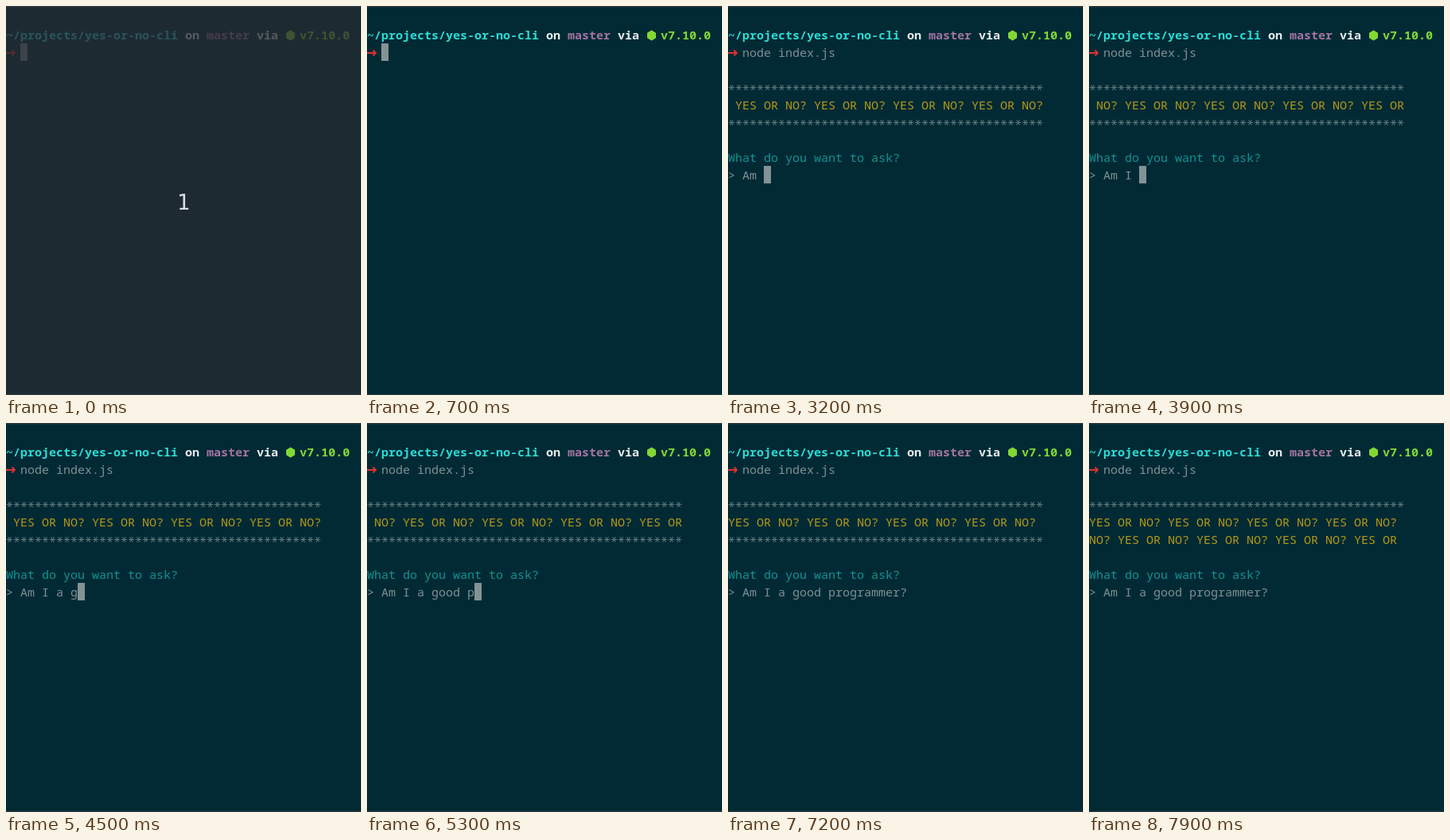
These frames come from a looping animation (446 by 489 pixels, 8 s). An HTML page:

```html
<!DOCTYPE html>
<html lang="en">
<head>
<meta charset="utf-8">
<title>Yes or no terminal</title>
<style>
  html, body { margin: 0; width: 100%; height: 100%; overflow: hidden; background: #022a35; }
  svg { display: block; width: 446px; height: 489px; }
  text { font: 15px "Noto Sans Mono", "DejaVu Sans Mono", monospace; white-space: pre; }
  .bold { font-weight: 700; }
  #count { font: 27px "DejaVu Sans Mono", "Noto Sans Mono", monospace; }
</style>
</head>
<body>
<svg id="stage" viewBox="0 0 446 489">
  <rect width="446" height="489" fill="#022a35"/>
  <g id="screen"></g>
  <g id="intro">
    <rect width="446" height="489" fill="#282b31" opacity=".76"/>
    <text id="count" x="223" y="256" text-anchor="middle" fill="#d8dcdd">1</text>
  </g>
  <path d="M0 .75H446M0 488.5H446" stroke="#2b383e" stroke-width="1.5"/>
</svg>
<script>
const LOOP = 8000, CELL = 9, ROW = 22, COLS = 44;
const GREY = "#7f9093", TEAL = "#149291", GOLD = "#b39a17";
const COMMAND = "node index.js", QUESTION = "Am I a good programmer?";
const YES_FIRST = Array(4).fill("YES OR NO?").join(" ");
const NO_FIRST = Array(4).fill("NO? YES OR").join(" ");
const RUN = 1800, BANNER = 2600, TOGGLE = 720, ENTER = 7150;

const screen = document.getElementById("screen");
const intro = document.getElementById("intro");

function add(tag, attrs) {
  const el = document.createElementNS("http://www.w3.org/2000/svg", tag);
  for (const key in attrs) el.setAttribute(key, attrs[key]);
  screen.appendChild(el);
  return el;
}

function label(col, row, fill, content = "", cls = "") {
  const el = add("text", { x: col * CELL, y: 42 + row * ROW, fill, class: cls });
  el.textContent = content;
  return el;
}

function starRow(row) {
  const y = 36.5 + row * ROW;
  let d = "";
  for (let i = 0; i < COLS; i++) {
    const x = (i + 0.5) * CELL;
    for (const angle of [0, Math.PI / 3, -Math.PI / 3]) {
      const dx = 3.8 * Math.cos(angle), dy = 3.8 * Math.sin(angle);
      d += `M${(x - dx).toFixed(1)} ${(y - dy).toFixed(1)}L${(x + dx).toFixed(1)} ${(y + dy).toFixed(1)}`;
    }
  }
  return add("path", { d, stroke: "#587377", "stroke-width": 1.1 });
}

const show = (el, on) => el.setAttribute("visibility", on ? "visible" : "hidden");

label(0, 0, "#2adcd5", "~/projects/yes-or-no-cli", "bold");
label(25, 0, "#e6eeee", "on", "bold");
label(28, 0, "#a3749f", "master", "bold");
label(35, 0, "#e6eeee", "via", "bold");
add("path", { d: "M357.5 30.5l5.5 3.2v6.6l-5.5 3.2l-5.5-3.2v-6.6z", fill: "#82d833" });
label(41, 0, "#82d833", "v7.10.0", "bold");
add("path", { d: "M0 59H10.5M7.5 55.5L11 59L7.5 62.5", fill: "none", stroke: "#e03131", "stroke-width": 1.8 });

const command = label(2, 1, GREY);
const topStars = starRow(3);
const banner = label(1, 4, GOLD);
const bottomStars = starRow(5);
const lowerBanner = label(0, 5, GOLD, NO_FIRST);
const ask = label(0, 7, TEAL, "What do you want to ask?");
const prompt = label(0, 8, GREY, ">");
const answer = label(2, 8, GREY);
const cursor = add("rect", { width: CELL, height: ROW, fill: "#839395" });

const commandKeys = [[700, 0], [1600, COMMAND.length]];
const questionKeys = [[2600, 0], [3190, 3], [4450, 8], [5290, 13], [6450, 22], [6750, 23]];

// Number of characters typed by time t, linear between keys.
function typed(keys, t) {
  if (t <= keys[0][0]) return 0;
  for (let i = 1; i < keys.length; i++) {
    const [t0, n0] = keys[i - 1], [t1, n1] = keys[i];
    if (t < t1) return Math.floor(n0 + (n1 - n0) * (t - t0) / (t1 - t0));
  }
  return keys[keys.length - 1][1];
}

function render(t) {
  intro.setAttribute("opacity", Math.max(0, Math.min(1, (500 - t) / 250)));

  const running = t >= RUN;
  const commandCount = typed(commandKeys, t);
  const questionCount = typed(questionKeys, t);
  command.textContent = COMMAND.slice(0, commandCount);
  answer.textContent = QUESTION.slice(0, questionCount);
  for (const el of [topStars, ask, prompt]) show(el, running);

  const tick = Math.floor((t - BANNER) / TOGGLE);
  const entered = t >= ENTER;
  const spilled = entered && tick >= 7;
  banner.textContent = tick < 0 ? "" : entered || tick % 2 === 0 ? YES_FIRST : NO_FIRST;
  banner.setAttribute("x", entered ? 0 : CELL);
  show(bottomStars, running && !spilled);
  show(lowerBanner, spilled);

  cursor.setAttribute("x", CELL * (2 + (running ? questionCount : commandCount)));
  cursor.setAttribute("y", 25 + ROW * (running ? 8 : 1));
  show(cursor, !entered);
}

const start = performance.now();
function frame() {
  render((performance.now() - start) % LOOP);
  requestAnimationFrame(frame);
}
render(0);
requestAnimationFrame(frame);
</script>
</body>
</html>
```
